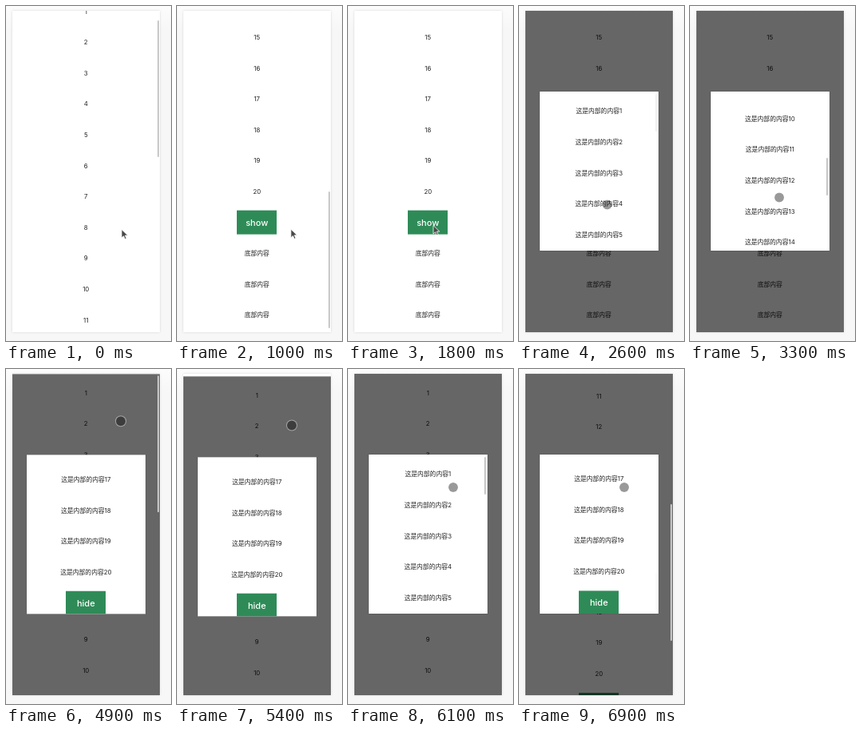
An HTML page for the animation above (7000 ms loop, 207 by 419 pixels).

```html
<!DOCTYPE html>
<html lang="zh">
<head>
<meta charset="utf-8">
<title>Scroll chaining</title>
<style>
  html, body { margin: 0; width: 100%; height: 100%; overflow: hidden; }
  body {
    position: relative;
    background: linear-gradient(#fcfcfc, #f7f7f7 30px);
    font: 7.8px/38.6px Inter, "Noto Sans CJK SC", "Noto Sans CJK", sans-serif;
    color: #222;
    text-align: center;
  }
  div, svg { position: absolute; }
  #shade, #phone { left: 7.5px; top: 5.5px; width: 185.5px; height: 402.5px; }
  #shade { box-shadow: 0 0 3px #0002; }
  #phone { overflow: hidden; background: #fff; }
  #layer, #mask { inset: 0; }
  #mask { background: #0009; }
  #modal {
    left: 18.3px; top: 101.7px; width: 149px; height: 198.6px;
    overflow: hidden;
    background: #fff;
    box-shadow: 0 0 1px #0006;
  }
  .list { left: 0; top: 5.2px; width: 100%; }
  .row { left: 0; width: 100%; height: 38.6px; white-space: nowrap; }
  .button {
    left: 50%; width: 50px; height: 30px; margin: 4.2px 0 0 -25px;
    background: #2e8b57;
    color: #fff;
    font-size: 11px; font-weight: 500; line-height: 30px;
  }
  .bar { top: 0; width: 2px; border-radius: 1px; background: #c8c8c8; }
  #pageBar { right: 1.3px; height: 171px; }
  #innerBar { right: 1.5px; height: 47px; }
  #touch {
    left: -7.5px; top: -7.5px; width: 12px; height: 12px;
    border: 1.5px solid #fff6; border-radius: 50%;
    background: #0006; background-clip: padding-box;
  }
  #arrow { left: 0; top: 0; overflow: visible; }
</style>
</head>
<body>
<div id="shade"></div>
<div id="phone">
  <div id="page" class="list"></div>
  <div id="layer">
    <div id="mask"></div>
    <div id="modal">
      <div id="inner" class="list"></div>
      <div id="innerBar" class="bar"></div>
    </div>
  </div>
  <div id="pageBar" class="bar"></div>
</div>
<div id="touch"></div>
<svg id="arrow" width="10" height="13">
  <path d="M0 0V10.5L2.6 8.2 4.3 12 6.1 11.2 4.4 7.5H7.8Z" fill="#484848" stroke="#fff" stroke-width=".8"/>
</svg>
<script>
const LOOP = 7000, STEP = 100, ROW = 38.6, OPEN = 2100;
const PAGE_END = 531.4, INNER_END = 611.6, BOUNCE = 6.7;
const $ = id => document.getElementById(id);

function add(list, slot, text, className = 'row') {
  const el = document.createElement('div');
  el.className = className;
  el.textContent = text;
  el.style.top = slot * ROW + 'px';
  list.append(el);
}

for (let i = 0; i < 20; i++) {
  add($('page'), i, i + 1);
  add($('inner'), i, '这是内部的内容' + (i + 1));
}
add($('page'), 20, 'show', 'button');
add($('inner'), 20, 'hide', 'button');
for (let i = 21; i < 24; i++) add($('page'), i, '底部内容');

function move(id, x, y) {
  $(id).style.transform = `translate(${x}px, ${y}px)`;
}

function draw() {
  const t = Math.floor(performance.now() % LOOP / STEP) * STEP;
  const progress = (from, to) => Math.min(1, Math.max(0, (t - from) / (to - from)));
  const ease = (from, to) => {
    const p = progress(from, to);
    return p * p * (3 - 2 * p);
  };
  const shown = (from, to) => ease(from, from + 100) - ease(to, to + 300);

  const page = PAGE_END * (ease(-130, 900) - ease(3800, 4890) + ease(6500, 7115))
    - BOUNCE * Math.sin(Math.PI * progress(4890, 5500));
  const inner = INNER_END * (ease(2800, 3735) - ease(5600, 6100) + ease(6200, 6550));

  // Pointer: to the button, into the modal, out over the mask, back in.
  const toButton = ease(900, 1600), intoModal = ease(2400, 2700);
  const out = ease(3600, 3700), back = ease(5400, 5600);
  const x = 145 - 38 * toButton + 5 * intoModal + 32 * out - 12 * back;
  const y = 279.5 - 5 * toButton - 35 * intoModal - 158 * out
    - 23 * ease(3800, 4300) + 12 * ease(4300, 5400) + 77.5 * back;

  move('page', 0, -page);
  move('layer', 0, Math.max(0, -page));
  move('inner', 0, -inner);
  move('pageBar', 0, 2.2 + .421 * Math.max(0, page));
  move('innerBar', 0, 3 + .237 * inner);
  move('touch', x, y);
  move('arrow', x, y);
  $('pageBar').style.opacity = shown(-100, 1100) + shown(3800, 4900) + shown(6500, LOOP);
  $('innerBar').style.opacity = shown(2000, 2400) + shown(2800, 3700) + shown(5600, 6650);

  const open = t >= OPEN;
  $('layer').style.display = $('touch').style.display = open ? '' : 'none';
  $('arrow').style.display = open ? 'none' : '';
  requestAnimationFrame(draw);
}
draw();
</script>
</body>
</html>
```
